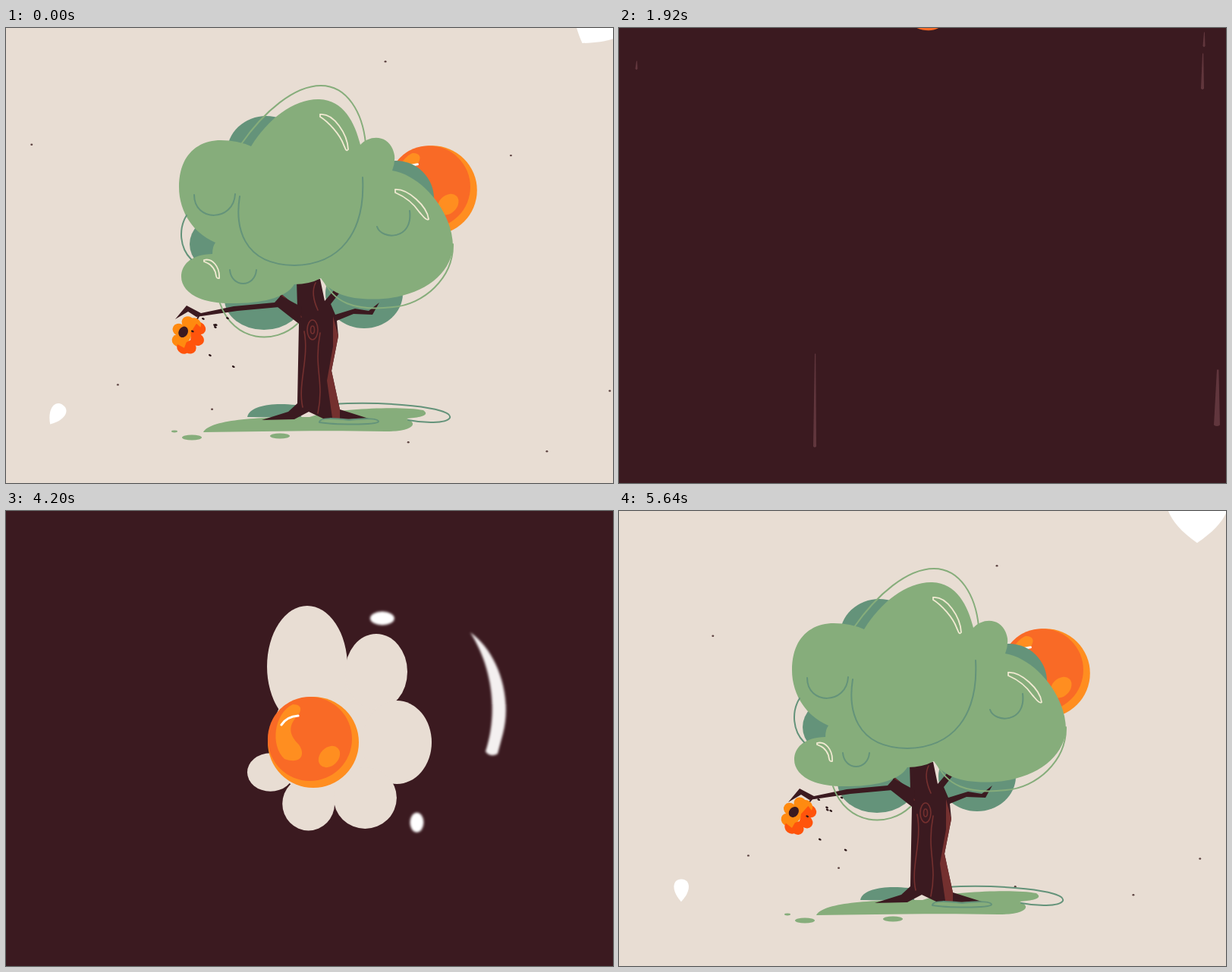
Recreate the animation shown at these times as an HTML page. Size 800x600 px, loop 5680 ms.

```html
<!DOCTYPE html>
<html lang="en">
<head>
<meta charset="utf-8">
<title>Honey tree</title>
<style>
html, body { margin: 0; width: 100%; height: 100%; overflow: hidden; background: #e8ddd3; }
svg { display: block; width: 100vw; height: 100vh; }
</style>
</head>
<body>
<svg id="stage" viewBox="0 0 800 600">
  <defs><filter id="soft"><feGaussianBlur stdDeviation="1.6"/></filter></defs>
  <g id="scene"></g>
</svg>
<script>
const LOOP = 5680;
const CREAM = '#e8ddd3', DARK = '#3b1a20', WOOD = '#74302f', LEAF = '#86ad7b', PINE = '#64937a',
      ORANGE = '#f96a26', AMBER = '#ff8e20', PLUM = '#6c3f45';

const clamp = v => Math.max(0, Math.min(1, v));
const span = (t, a, b) => clamp((t - a) / (b - a));
const out = p => 1 - (1 - p) ** 3;
const smooth = p => p * p * (3 - 2 * p);
const lerp = (a, b, p) => a + (b - a) * p;
const r2 = n => Math.round(n * 100) / 100;

const ellipse = (x, y, rx, ry, fill, extra = '') =>
  `<ellipse cx="${r2(x)}" cy="${r2(y)}" rx="${r2(Math.max(0, rx))}" ry="${r2(Math.max(0, ry))}" fill="${fill}" ${extra}/>`;
const shape = (d, fill) => `<path d="${d}" fill="${fill}"/>`;
const line = (d, color, w = 2, extra = '') =>
  `<path d="${d}" fill="none" stroke="${color}" stroke-width="${w}" stroke-linecap="round" ${extra}/>`;
const group = (transform, body, extra = '') => `<g transform="${transform}" ${extra}>${body}</g>`;
const scaleAt = (x, y, s) => `translate(${x} ${y}) scale(${s}) translate(${-x} ${-y})`;

function mixPath(a, b, p) {
  const goal = b.match(/-?[\d.]+/g);
  let i = 0;
  return a.replace(/-?[\d.]+/g, n => r2(lerp(+n, +goal[i++], p)));
}

// Stroke that swells from a point to a round head along a quadratic curve.
function tail([x0, y0, cx, cy, x1, y1, w], color, from, to) {
  if (to <= from) return '';
  const left = [], right = [];
  let x, y;
  for (let i = 0; i <= 12; i++) {
    const p = lerp(from, to, i / 12), q = 1 - p;
    x = q * q * x0 + 2 * q * p * cx + p * p * x1;
    y = q * q * y0 + 2 * q * p * cy + p * p * y1;
    const dx = q * (cx - x0) + p * (x1 - cx), dy = q * (cy - y0) + p * (y1 - cy);
    const k = w / 2 * (i / 12) ** .6 / Math.hypot(dx, dy);
    left.push(`${r2(x - dy * k)} ${r2(y + dx * k)}`);
    right.unshift(`${r2(x + dy * k)} ${r2(y - dx * k)}`);
  }
  return shape('M' + left.concat(right).join('L') + 'Z', color) + ellipse(x, y, w / 2, w / 2, color);
}

const CROWN = 'M323 156C345 120 380 93 413 94C445 95 460 125 467 154C480 140 507 140 512 168Q513 178 509 188C550 195 590 245 589 290C584 335 530 362 470 357C440 355 425 345 415 330Q400 338 380 338C368 358 330 364 290 363C250 362 231 345 231 328C231 308 250 298 272 298Q272 288 276 283C245 270 228 240 228 210C228 165 255 148 283 148Q305 148 323 156Z';
const BUD = 'M323 240C335 235 350 245 358 240C375 225 395 226 410 228C430 228 440 235 450 245Q462 250 462 262C460 280 445 290 430 295C415 300 405 300 398 300C396 310 394 320 392 330Q388 350 380 358C360 370 320 368 295 366C265 366 247 355 247 338C247 320 250 312 262 310Q255 300 260 290C268 285 275 285 280 285C276 260 285 245 295 238Q308 234 323 240Z';

// Back foliage: grown ellipse, then the ellipse while it swells.
const BACK = [
  [343, 165, 52, 49, 344, 162, 60, 51],
  [281, 285, 39, 36, 320, 266, 47, 52],
  [340, 358, 52, 40, 338, 352, 50, 42],
  [514, 225, 50, 50, 511, 223, 61, 52],
  [472, 350, 51, 46, 478, 316, 57, 80]
];
const BACK_TAILS = [[332, 118, 345, 62, 405, 62, 28], [372, 380, 355, 425, 290, 428, 32]];
const LEAF_TAILS = [[438, 341, 540, 365, 592, 295, 28], [374, 368, 325, 410, 245, 374, 27]];
const WOOD_TAILS = [
  [252, 199, 180, 198, 208, 260, 14], [254, 321, 230, 325, 206, 352, 9],
  [424, 362, 474, 320, 488, 219, 11], [416, 187, 500, 95, 632, 158, 5],
  [450, 462, 444, 400, 493, 376, 6], [370, 435, 375, 400, 364, 370, 6]
];

const GROUND =
  shape('M318 513C320 500 345 493 382 497L390 514Z', PINE) +
  shape('M260 533C270 515 340 513 400 513C430 502 520 498 550 504C560 511 545 514 528 515C545 522 535 532 500 532C420 530 330 532 260 533Z', LEAF) +
  line('M430 496C500 492 590 500 585 514C580 522 550 521 530 517', PINE) +
  ellipse(245, 540, 13, 3.5, LEAF) + ellipse(222, 532, 4, 1.4, LEAF) + ellipse(361, 538, 13, 3.5, LEAF);

const TRUNK =
  shape('M383 333L414 331L420 360L432 346L439 350L428 364L434 378L460 370L478 373L492 362L483 378L458 377L436 386L438 406L429 452L440 503L478 515L440 516L418 515L399 506L380 516L337 517L372 506L384 495L386 390L358 368L362 350L384 368Z', DARK) +
  shape('M431 380L438 406L429 452L440 503L440 516L430 514L423 465L431 420Z', WOOD) +
  line('M393 400C400 435 384 470 391 500M414 402C405 450 420 465 411 508M364 353Q384 370 389 381M408 336Q401 350 411 372', WOOD, 1.6) +
  ellipse(404, 398, 7, 13, 'none', `stroke="${WOOD}" stroke-width="1.6"`) +
  ellipse(404, 398, 2.5, 5, 'none', `stroke="${WOOD}" stroke-width="1.6"`);
const BRANCH = shape('M390 368L362 353L354 362L300 367L257 376L238 366L223 384L240 374L251 381L305 373L360 368L388 386Z', DARK);
const ROOTS = line('M413 520C413 513 435 515 452 517C475 514 491 515 491 519C488 524 430 523 413 520', PINE);

const OUTLINES =
  line('M310 153C340 110 380 76 415 76C450 76 470 112 474 152M589 285C590 330 550 365 510 368C460 374 430 362 418 330M282 363C300 415 355 418 384 390', LEAF) +
  line('M308 222C302 260 310 312 380 313C440 312 474 270 470 197M248 220C248 256 300 256 302 219M295 319C297 343 328 343 330 319M489 262C495 280 537 280 532 241', PINE);
const SIDE_LINE = line('M238 247C227 265 229 290 244 305', PINE);
const GLINTS = line('M414 114C432 112 450 140 451 160C448 164 447 158 445 154C440 140 425 124 414 117ZM513 213C530 212 555 235 557 252C554 255 548 246 545 243C535 228 520 220 513 217ZM261 306C272 303 282 315 281 330C277 331 277 327 276 322C272 312 266 310 261 308Z', '#f1ead2', 1.8);

const HIVE_TOP = [254, 380];
const HIVE = (() => {
  const lumps = [[-8, 14], [8, 14], [-14, 28], [13, 28], [-8, 41], [9, 42], [2, 46], [0, 12]];
  const dots = lumps.map(([x, y]) => ellipse(x, y, 9, 8, x < 2 ? '#ff8a10' : '#ff540c')).join('');
  return line('M0 0V7', DARK) + dots + shape('M-12 12H4V46H-12Z', '#ff8a10') +
    shape('M2 10L10 12L18 28L10 43L4 52L2 38L6 32L1 24Z', '#ff540c') + ellipse(-8, 28, 6, 7.5, DARK);
})();

function hiveAngle(u) {
  const s = u - 5610;
  return s < 0 ? 42 * smooth(span(u, 5400, 5610)) : 42 * Math.cos(s / 595 * 2 * Math.PI) * Math.exp(-s / 900);
}

function bees(u) {
  let s = '';
  for (let i = 0; i < 8; i++) {
    const a = i * 2.4 + u * (.0022 + i % 3 * .0006), reach = 24 + i * 5 % 27;
    const x = 251 + Math.cos(a) * reach, y = 403 + Math.sin(a * 1.3 + i) * reach * .9;
    s += ellipse(x, y, 2, 1.3, '#2a1517', `transform="rotate(25 ${r2(x)} ${r2(y)})"`);
  }
  return s;
}

// Petals: place, radii, growth factor over 560 ms.
const PETALS = [
  [342, 75, 36, 42, 4], [447, 24, 14, 17, 4], [154, 119, 14, 17, 4], [173, 186, 10, 11, 4],
  [574, 162, 21, 29, 2.08], [610, 191, 8, 9, 4], [611, 353, 36, 43, 6], [0, 262, 18, 24, 4],
  [112, 456, 17, 19, 4], [238, 407, 8, 11, 1.96], [362, 552, 25, 30, 4], [457, 580, 38, 28, 5],
  [615, 592, 42, 26, 5], [660, 441, 20, 14, 4], [757, 115, 36, 20, 4], [8, 104, 18, 14, 4]
];
const PETAL = 'M0 -1C1.1 -1 1.3 0 0 1C-1.3 0 -1.1 -1 0 -1Z';
// Specks: place and step per 40 ms.
const SPECKS = [[126, 165, -90, -11], [677, 505, 35, 52], [522, 494, 8, 51], [171, 454, -23, 16], [498, 73, 2, -28], [765, 458, 30, 20], [606, 206, 58, -37], [290, 470, -18, 32]];

function debris(u) {
  let s = '';
  if (u < 7000) for (const [x, y, rx, ry, rate] of PETALS) {
    const k = u < 5080 ? span(u, 4850, 5080) ** .6 : rate ** ((u - 5080) / 560);
    const px = 400 + (x - 400) * k, py = 310 + (y - 310) * k, g = Math.min(k, 2.4) ** .45;
    const big = rate === 2.08 ? Math.min(k, 2.4) ** .6 : 1;
    if (k > 0 && px > -120 && px < 920 && py > -120 && py < 720)
      s += group(`translate(${r2(px)} ${r2(py)}) rotate(${r2((u - 5640) * .8)}) scale(${r2(rx * g * big)} ${r2(ry * g)})`, shape(PETAL, '#fff'));
  }
  if (u > 5440 && u < 6000) for (const [x, y, dx, dy] of SPECKS) {
    const k = (u - 5640) / 40;
    s += ellipse(x + dx * k, y + dy * k, 1.5, 1.2, '#5d4442');
  }
  return s;
}

function ball(x, y, r) {
  const s = r / 60;
  return group(`translate(${r2(x)} ${r2(y)}) scale(${r2(s)})`,
    ellipse(0, 0, 60, 60, AMBER) + ellipse(-4.5, -4.5, 55.5, 55.5, ORANGE) +
    ellipse(21, 19, 16, 12, AMBER, 'transform="rotate(-45 21 19)"') +
    shape('M-27 -50C-52 -38 -57 4 -38 22C-14 30 -10 14 -20 2C-34 -12 -32 -24 -19 -37C-14 -46 -18 -50 -27 -50Z', AMBER) +
    line('M-42 -23Q-35 -34 -20 -35', '#fff', 3.2));
}

function sun(u) {
  const a = smooth(span(u, 4860, 5080)), b = out(span(u, 5100, 5420));
  return ball(lerp(lerp(405, 480, a), 562, b), lerp(lerp(305, 318, a), 214, b), lerp(lerp(60, 48, a), 59, b));
}

function tree(u) {
  const rise = out(span(u, 4900, 5060)), swell = out(span(u, 4960, 5080)), grow = smooth(span(u, 5080, 5360));
  const head = out(span(u, 4960, 5080)), heel = smooth(span(u, 5085, 5240));
  const tails = (list, color) => list.map(c => tail(c, color, heel, head)).join('');
  const back = BACK.map(([x, y, rx, ry, sx, sy, srx, sry]) =>
    ellipse(lerp(lerp(400, sx, swell), x, grow), lerp(lerp(340, sy, swell), y, grow),
      lerp(srx * swell, rx, grow), lerp(sry * swell, ry, grow), PINE)).join('');
  const blur = u < 5300 ? 'filter="url(#soft)"' : '';
  const detail = span(u, 5220, 5400), hive = out(span(u, 5320, 5500));
  let s = sun(u);
  s += group(scaleAt(400, 520, r2(rise)), GROUND);
  s += group('', back + tails(BACK_TAILS, PINE), blur);
  s += group(`translate(400 515) scale(${r2(rise)}) translate(-400 -515)`, TRUNK + ROOTS);
  s += group(scaleAt(388, 375, r2(out(span(u, 5040, 5300)))), BRANCH);
  s += group(scaleAt(390, 330, r2(swell)), shape(mixPath(BUD, CROWN, grow), LEAF), blur);
  s += tails(LEAF_TAILS, LEAF) + tails(WOOD_TAILS, DARK);
  if (u > 5050) s += SIDE_LINE + GLINTS;
  s += group('', OUTLINES, `opacity="${r2(detail)}"`);
  if (hive > 0) s += group(`translate(${HIVE_TOP}) rotate(${r2(hiveAngle(u))}) scale(${r2(hive)})`, HIVE);
  if (u > 5440) s += bees(u);
  return s;
}

// The camera dives into the dark mouth of the hive.
function dive(u, t) {
  const p = span(t, 1480, 1800);
  if (!p || t > 1800) return 'translate(0 0)';
  const a = hiveAngle(u) * Math.PI / 180, zoom = 110 ** (p * p);
  const x = HIVE_TOP[0] - 8 * Math.cos(a) - 28 * Math.sin(a), y = HIVE_TOP[1] - 8 * Math.sin(a) + 28 * Math.cos(a);
  return `translate(${r2(lerp(x, 400, smooth(p)))} ${r2(lerp(y, 300, smooth(p)))}) scale(${r2(zoom)}) translate(${r2(-x)} ${r2(-y)})`;
}

const STREAKS = [[258, 142, 122, 4], [788, 163, 73, 8], [78, 382, 116, 4], [604, 411, 92, 7], [787, 395, 22, 3], [769, 546, 46, 4], [771, 518, 18, 3], [23, 556, 10, 3]];
function streaks(t) {
  const fade = span(t, 1820, 1950) * (1 - span(t, 3080, 3240));
  const bars = STREAKS.map(([x, y, h, w]) => {
    const top = ((y + 150 - (t - 2640) * .4) % 800 + 800) % 800 - 150;
    return shape(`M${x} ${r2(top)}L${x + w * .3} ${r2(top)}L${x + w / 2} ${r2(top + h)}Q${x} ${r2(top + h + 3)} ${x - w / 2} ${r2(top + h)}Z`, PLUM);
  });
  return group('', bars.join(''), `opacity="${r2(fade)}"`);
}

const DROP =
  shape('M387 224C386 214 387 205 389 204L393 213C399 202 405 203 411 214C425 240 447 295 448 318C447 350 425 369 408 369C385 369 360 345 359 318C360 285 372 250 387 224Z', ORANGE) +
  shape('M372 290C385 287 388 293 387 305C386 325 392 340 405 345C380 345 357 315 366 296Z', AMBER) +
  shape('M405 252C412 260 418 275 416 285C414 289 409 288 408 283Z', AMBER) +
  line('M391 243Q403 215 413 241', AMBER, 1.2) + line('M405 343Q424 345 430 332', '#fff', 7);
const THREAD = line('M393 134L394.5 164', ORANGE, 2.5) + ellipse(385, 59, 1.2, 2, ORANGE) + ellipse(384, 144, 1.3, 1.5, ORANGE);

function drop(t) {
  if (t < 1880 || t > 3260) return '';
  const fall = out(span(t, 1900, 2360)), s = lerp(1, .05, smooth(span(t, 2940, 3250)));
  const sway = 1 + .03 * Math.sin((t - 2640) / 110);
  return group(`translate(408 ${r2(307 - 420 * (1 - fall))}) scale(${r2(s * (2 - sway))} ${r2(s * sway)}) translate(-408 -307)`,
    DROP + (t < 2960 ? THREAD : ''));
}

function ripples(t) {
  const p = (t - 3250) / 230;
  if (p < 0 || t > 3780) return '';
  const k = out(clamp(p / 2.2)) / out(1 / 2.2), fade = 1 - span(t, 3560, 3780);
  const ring = 'M405 248C445 246 483 285 485 318C483 355 420 377 375 375C345 374 324 335 325 312C327 270 365 250 405 248Z';
  const far = 'M405 217C460 210 521 275 522 322C520 370 430 402 370 402C330 399 292 340 293 300C300 255 350 220 405 217Z';
  const body = line(ring, PLUM, 6) +
    `<path d="${far}" fill="none" stroke="${PLUM}" stroke-width="6" stroke-dasharray="34 10 80 12 14 10 36 44 24 18 22 24"/>` +
    `<path d="M396 241Q446 238 480 286M316 309Q328 360 371 379" fill="none" stroke="${ORANGE}" stroke-width="7"/>` +
    line('M401 284L414 287M426 293Q437 305 435 317M434 326L428 331M374 330L382 336', PLUM, 5);
  return group(scaleAt(408, 307, r2(k)), body, `opacity="${r2(fade)}" filter="url(#soft)"`);
}

const LOBES = [[397, 205, 53, 80], [488, 212, 41, 50], [515, 305, 46, 55], [474, 379, 42, 41], [398, 394, 38, 39], [320, 362, 46, 38], [272, 300, 58, 48], [320, 230, 56, 54]];
function egg(t) {
  if (t < 3860) return '';
  const p = span(t, 4840, 5080) ? (t - 4840) / 240 : 0;
  const s = p ? Math.exp(1.13 * p ** 1.3) : 1 - .04 * smooth(span(t, 4700, 4800)) * (1 - span(t, 4800, 4840));
  let white = ellipse(435, 300, 85 * out(span(t, 3880, 4060)), 85 * out(span(t, 3880, 4060)), CREAM);
  LOBES.forEach(([x, y, rx, ry], i) => {
    const g = out(span(t, 3900 + i * 48, 4100 + i * 48));
    white += ellipse(lerp(405, x, g), lerp(310, y, g), rx * g, ry * g, CREAM);
  });
  const fill = clamp((s - 1) / 1.5);
  if (p) white += ellipse(320, 316, 130 * fill, 120 * fill, CREAM);
  return group(scaleAt(410, 316, r2(s)), white);
}

function splash(t) {
  const p = span(t, 4040, 4420);
  if (p <= 0 || p >= 1) return '';
  const show = Math.min(1, p * 5, (1 - p) * 3);
  return group(`rotate(${r2((t - 4200) * .3)} 405 305)`,
    shape('M611 159C645 182 668 240 655 292L648 319Q638 324 632 316C650 260 638 200 611 159Z', '#f4f0f0') +
    ellipse(495, 141, 16, 9, '#fff') + ellipse(542, 410, 9, 13, '#fff'),
    `opacity="${r2(show)}" filter="url(#soft)"`);
}

function yolk(t) {
  if (t < 3240) return '';
  const p = span(t, 3600, 3860);
  return p ? ball(lerp(409, 405, p), lerp(306, 305, p), lerp(4, 60, out(p)) + 5 * Math.sin(p * Math.PI)) : ellipse(409, 306, 4, 4, AMBER);
}

function picture(t) {
  const u = t < 2400 ? t + LOOP : t;
  const inside = t >= 1800 && t < 5220;
  let s = `<rect width="800" height="600" fill="${inside ? DARK : CREAM}"/>`;
  if (inside) {
    s += t < 3260 ? streaks(t) + drop(t) : '';
    s += ripples(t) + splash(t) + egg(t);
    if (t < 4860) s += yolk(t);
  }
  if (u >= 4860) {
    if (t >= 1800 && t < 2400) return s;
    const blur = u < 5400 ? 'filter="url(#soft)"' : '';
    s += group(dive(u, t), group('', debris(u), blur) + tree(u));
  }
  return s;
}

const scene = document.getElementById('scene');
const start = performance.now();
function tick() {
  scene.innerHTML = picture((performance.now() - start) % LOOP);
  requestAnimationFrame(tick);
}
tick();
</script>
</body>
</html>
```
